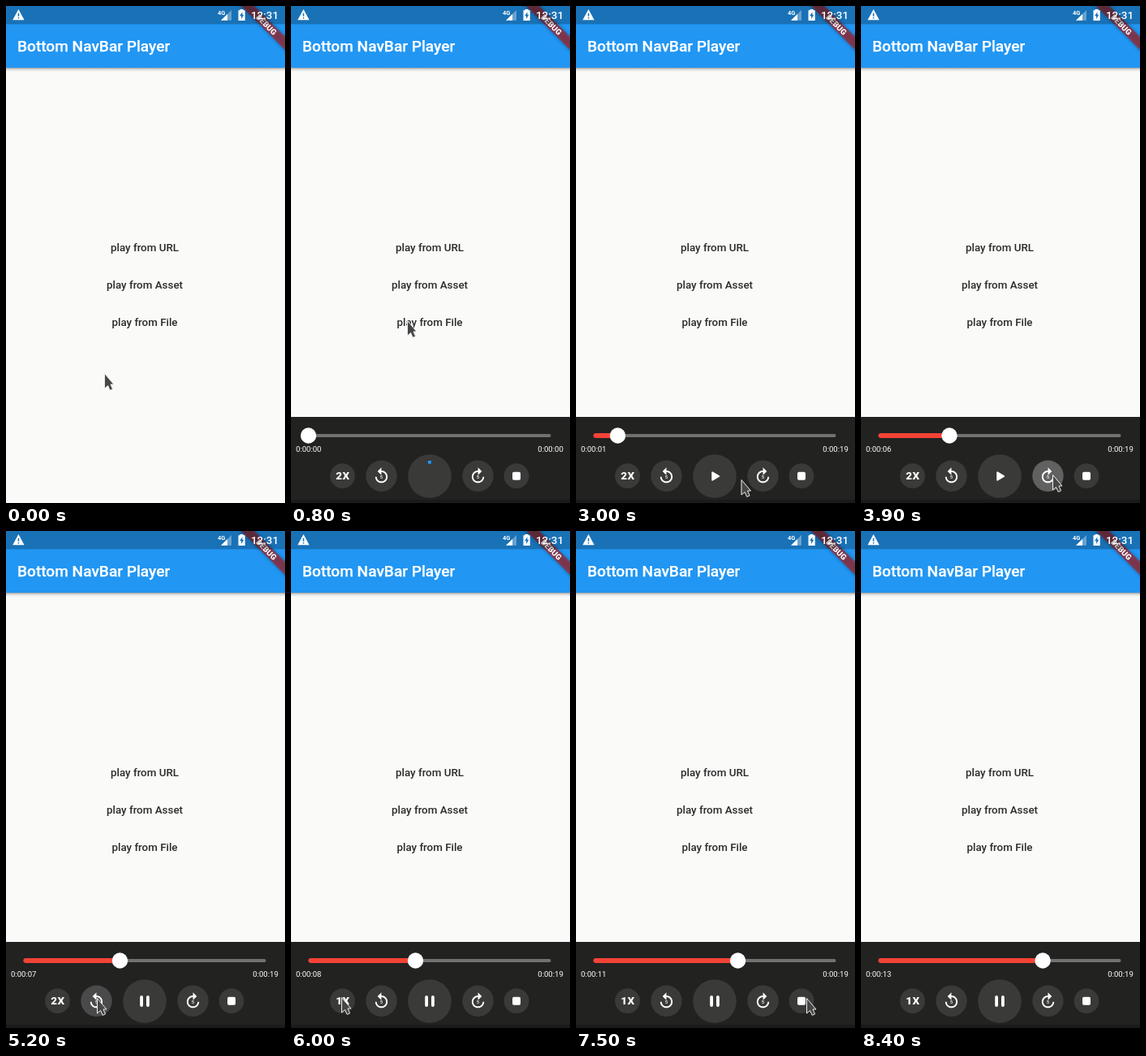
These frames come from a looping animation (344x612 px, 9.5 s). An HTML page:

```html
<!DOCTYPE html>
<html lang="en">
<head>
<meta charset="utf-8">
<title>Audio player</title>
<style>
  html, body { margin: 0; width: 100%; height: 100%; overflow: hidden; background: #fafaf8; }
  svg { display: block; width: 344px; height: 612px; font-family: Roboto, "Open Sans", sans-serif; }
  .title { font-size: 19.1px; font-weight: 500; fill: #fff; stroke: #fff; stroke-width: .25px; }
  .option { font-size: 13.38px; font-weight: 500; fill: #2b2b2b; text-anchor: middle; }
  .time { font-size: 9.56px; fill: #fff; }
  .speed { font-size: 13.4px; font-weight: 800; fill: #fff; text-anchor: middle; letter-spacing: .5px; }
  .five { font-size: 6px; font-weight: 700; fill: #ddd; text-anchor: middle; }
  .key { fill: #3a3a39; }
  .key.pressed { fill: #4a4a4a; }
  #forward.pressed { fill: #616161; }
</style>
</head>
<body>
<svg viewBox="0 0 344 612">
  <defs>
    <linearGradient id="shade" x2="0" y2="1">
      <stop offset="0" stop-opacity=".36"/>
      <stop offset=".4" stop-opacity=".12"/>
      <stop offset="1" stop-opacity="0"/>
    </linearGradient>
    <filter id="blur" x="-20%" y="-80%" width="140%" height="260%"><feGaussianBlur stdDeviation="2.5"/></filter>
    <path id="turn" d="M12 5V1L7 6l5 5V7c3.31 0 6 2.69 6 6s-2.69 6-6 6-6-2.69-6-6H4c0 4.42 3.58 8 8 8s8-3.58 8-8-3.58-8-8-8z" fill="#fff"/>
  </defs>

  <rect width="344" height="612" fill="#fafaf8"/>
  <rect y="76" width="344" height="5" fill="url(#shade)"/>
  <rect width="344" height="76" fill="#2196f3"/>
  <text class="title" x="14" y="56">Bottom NavBar Player</text>

  <text class="option" x="171" y="302">play from URL</text>
  <text class="option" x="171" y="348">play from Asset</text>
  <text class="option" x="171" y="394">play from File</text>

  <!-- corner ribbon -->
  <g transform="translate(344 0) rotate(45) scale(.9556)">
    <rect x="-45" y="28" width="90" height="12" opacity=".35" filter="url(#blur)"/>
    <rect x="-45" y="28" width="90" height="12" fill="#b71c1c" fill-opacity=".63"/>
    <text y="37.6" font-size="10.2" font-weight="900" fill="#fff" text-anchor="middle">DEBUG</text>
  </g>

  <!-- status bar -->
  <rect width="344" height="22.4" opacity=".25"/>
  <g fill="#fff">
    <path d="M15.4 4 22.6 17.2H8.2z"/>
    <path d="M14.7 8.8h1.5v4h-1.5zM14.7 14h1.5v1.5h-1.5z" fill="#1971b6"/>
    <path d="M278 5v12.8h-13z" opacity=".35"/>
    <path d="M273 10v7.8h-8z"/>
    <text x="261" y="11" font-size="7.4" font-weight="700">4G</text>
    <path d="M286.5 5.2h2V4h4v1.2h2.2V18h-8.2z"/>
    <path d="M291.4 7.2l-3.3 5h2v3.7l3.2-5.2h-1.9z" fill="#1971b6"/>
    <text x="302" y="15.8" font-size="13.4" font-weight="500">12:31</text>
  </g>

  <g id="panel">
    <rect y="506" width="344" height="106" fill="#222221"/>
    <rect y="608" width="344" height="4" fill="#1b1b1b"/>
    <rect x="21.5" y="527.1" width="299" height="3.8" rx="1.9" fill="#717171"/>
    <rect id="played" x="21.5" y="526.1" height="5.8" rx="2.8" fill="#f44336"/>
    <circle id="thumb" cy="529" r="9.7" fill="#fff"/>
    <text id="now" class="time" x="6" y="548.9"></text>
    <text id="total" class="time" x="304.3" y="548.9"></text>

    <circle class="key" cx="63.5" cy="578.7" r="15.4"/>
    <text id="speed" class="speed" x="63.8" y="583.4"></text>

    <circle id="back" class="key" cx="111.5" cy="578.7" r="19.2"/>
    <use href="#turn" transform="translate(100 567.2) scale(.956)"/>
    <text class="five" x="111.6" y="582">5</text>

    <circle id="main" class="key" cx="171" cy="579" r="26.8"/>
    <circle id="spinner" cx="171" cy="579" r="17.2" fill="none" stroke="#2196f3" stroke-width="3.8" transform="rotate(-97 171 579)"/>
    <path id="pause" d="M167.1 573.9v10.1M174.9 573.9v10.1" stroke="#fff" stroke-width="3.8" stroke-linecap="round"/>
    <path id="play" d="M168.2 574.3v9.4l8-4.7z" fill="#fff" stroke="#fff" stroke-width="2" stroke-linejoin="round"/>

    <circle id="forward" class="key" cx="230.5" cy="578.7" r="19.2"/>
    <use href="#turn" transform="translate(242 567.2) scale(-.956 .956)"/>
    <text class="five" x="230.6" y="582">5</text>

    <circle class="key" cx="278" cy="578.7" r="15.4"/>
    <rect x="273" y="573.7" width="10" height="10" rx="1.8" fill="#fff"/>
  </g>

  <path id="cursor" d="M.5 .5V19L4.6 15.5 7.2 21.3 10.6 19.8 8 14H12z" fill="#474747" stroke="#eee" stroke-linejoin="round"/>
</svg>

<script>
const LOOP = 9500, STEP = 100, GLIDE = 400;
const TRACK_START = 21.5, PX_PER_MS = .01535, SKIP = 5000;

// moments of the session, in ms
const OPEN = 800, START = 850, LOADED = 1200, PAUSE = 2800, SEEK = 3825,
      RESUME = 4400, REWIND = 5000, DOUBLE = 5950, STOP = 8300, HIDE = 8400;

// pointer glides: when it leaves, and where its tip goes
const home = { x: 121, y: 452 };
const glides = [
  { leave: 0, x: 143, y: 387 },
  { leave: 1600, x: 168, y: 585 },
  { leave: 2900, x: 310, y: 577 },
  { leave: 3400, x: 236, y: 577 },
  { leave: 3900, x: 173, y: 576 },
  { leave: 4500, x: 112, y: 575 },
  { leave: 5300, x: 62, y: 574 },
  { leave: 6200, x: 284, y: 575 }
];

const el = id => document.getElementById(id);
const show = (id, on) => el(id).style.display = on ? "" : "none";
const clamp = (v, lo, hi) => Math.min(Math.max(v, lo), hi);
const span = (t, from, to) => clamp(t, from, to) - from;
const press = (id, on) => el(id).classList.toggle("pressed", on);
const just = (t, moment) => t >= moment && t < moment + 200;
const clock = ms => "0:00:" + String(Math.floor(ms / 1000)).padStart(2, "0");

function pointer(t) {
  return glides.reduce((p, g) => {
    const k = clamp((t - g.leave) / GLIDE, 0, 1);
    return { x: p.x + (g.x - p.x) * k, y: p.y + (g.y - p.y) * k };
  }, home);
}

function draw(t) {
  // the second run past DOUBLE adds the extra speed
  const heard = span(t, START, PAUSE) + span(t, RESUME, STOP) + span(t, DOUBLE, STOP);
  const slide = clamp((t - SEEK) / 100, 0, 1);
  const x = TRACK_START + PX_PER_MS * (heard + SKIP * slide);
  const loading = t < LOADED, paused = t >= PAUSE && t < RESUME;

  show("panel", t >= OPEN);
  el("played").setAttribute("width", x - TRACK_START);
  el("thumb").setAttribute("cx", x);
  el("now").textContent = clock(heard + (t >= SEEK ? SKIP : 0));
  el("total").textContent = clock(loading ? 0 : 19000);
  el("speed").textContent = t < DOUBLE ? "2X" : "1X";

  show("spinner", loading);
  el("spinner").style.strokeDasharray = `${4 + span(t, OPEN, LOADED) * .13} 200`;
  show("pause", !loading && !paused);
  show("play", paused);
  press("main", just(t, PAUSE) || just(t, RESUME));
  press("forward", just(t, SEEK));
  press("back", t >= REWIND && t < REWIND + 300);

  const p = pointer(t);
  show("cursor", t < HIDE);
  el("cursor").setAttribute("transform", `translate(${p.x} ${p.y})`);
}

const began = performance.now();
function tick() {
  const t = (performance.now() - began) % LOOP;
  draw(Math.floor(t / STEP) * STEP);
  requestAnimationFrame(tick);
}
tick();
</script>
</body>
</html>
```
